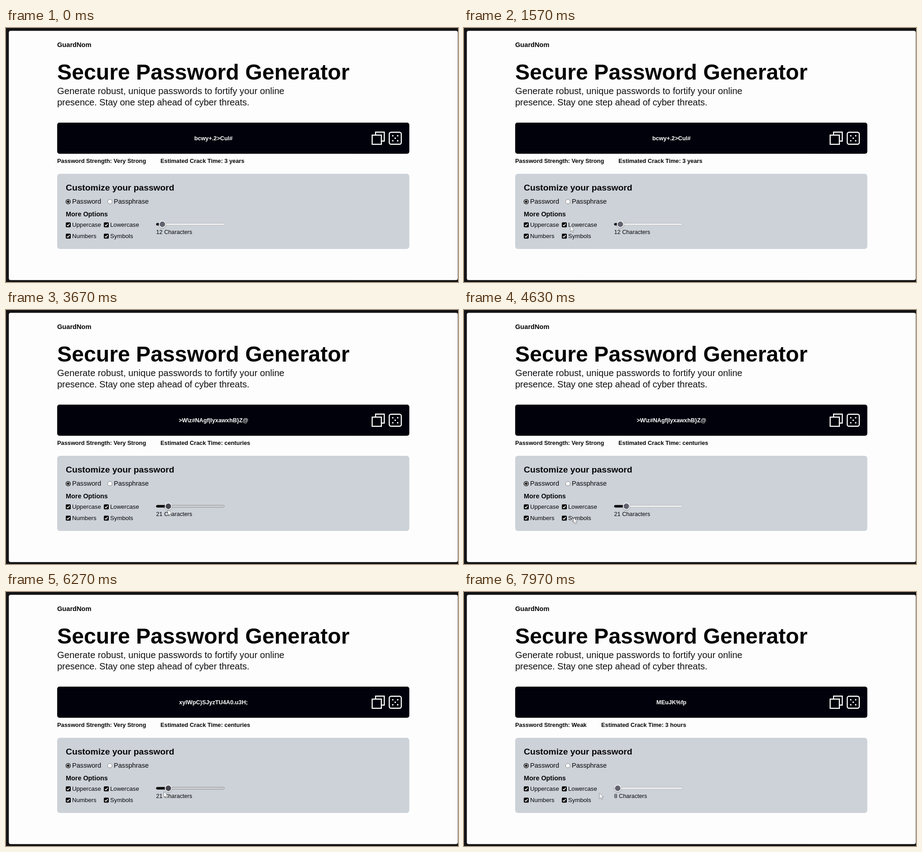
An HTML page that plays this animation: 998 by 561 pixels, repeating every 8000 ms.

```html
<!DOCTYPE html>
<html lang="en">
<head>
<meta charset="utf-8">
<title>Password generator</title>
<style>
  html, body { margin: 0; width: 100%; height: 100%; overflow: hidden; background: #141416; }
  svg { display: block; width: 100%; height: 100%; }
  text { font-family: "Liberation Sans", Arial, sans-serif; fill: #050507; white-space: pre; }
  .bold { font-weight: 700; }
  .option { font-size: 13.2px; }
  .mode { font-size: 14.6px; }
  .status { font-size: 12.8px; font-weight: 700; }
  .lead text { font-size: 20.2px; fill: #111114; }
  .tight { letter-spacing: -.12px; }
  .icon { fill: none; stroke: #fff; stroke-width: 2.4; }
</style>
</head>
<body>
<svg viewBox="0 0 998 561">
  <defs>
    <g id="box">
      <rect width="11" height="11" rx="2" fill="#050507"/>
      <path d="M2.5 5.7 4.6 7.9 8.6 3" fill="none" stroke="#fff" stroke-width="1.7"/>
    </g>
  </defs>
  <rect width="998" height="561" fill="#141416"/>
  <rect x="6.3" y="6.3" width="991.2" height="550.4" rx="4" fill="#fdfdfd"/>

  <text class="bold" x="113" y="42" font-size="14.6">GuardNom</text>
  <text class="bold" x="113" y="114" font-size="48.2">Secure Password Generator</text>
  <g class="lead">
    <text x="113" y="146">Generate robust, unique passwords to fortify your online</text>
    <text class="tight" x="113" y="171">presence. Stay one step ahead of cyber threats.</text>
  </g>

  <rect x="113" y="209" width="777.5" height="68.7" rx="5" fill="#01010c"/>
  <text id="password" class="bold" x="458" y="248" font-size="12.7" text-anchor="middle" style="fill:#fff"></text>
  <g class="icon">
    <rect x="808.5" y="236.6" width="20.3" height="20.3"/>
    <path d="M816 236V230h19.2v19.7H829"/>
    <rect x="846.2" y="230.2" width="26.6" height="26.6" rx="4"/>
  </g>
  <g id="pips" fill="#fff"></g>

  <text id="strength" class="status" x="113" y="298"></text>
  <text id="crack" class="status" y="298"></text>

  <rect x="113" y="322" width="777.5" height="166" rx="6" fill="#ccd2d8"/>
  <text class="bold" x="132" y="359.3" font-size="19.25">Customize your password</text>
  <circle cx="137.3" cy="383.5" r="4.8" fill="#fff" stroke="#050507" stroke-width="1.5"/>
  <circle cx="137.3" cy="383.5" r="2.8" fill="#050507"/>
  <circle cx="229.3" cy="383.5" r="4.9" fill="#fff" stroke="#7c7c80"/>
  <text class="mode" x="146" y="388">Password</text>
  <text class="mode" x="238" y="388">Passphrase</text>
  <text class="bold" x="132" y="416" font-size="14.4">More Options</text>

  <use href="#box" x="132" y="429.3"/>
  <use href="#box" x="216" y="429.3"/>
  <use href="#box" x="132" y="454.3"/>
  <use id="symbolsOn" href="#box" x="216" y="454.3"/>
  <rect id="symbolsOff" x="216.5" y="454.8" width="10" height="10" rx="2" fill="#fff" stroke="#767676"/>
  <text class="option" x="146" y="439">Uppercase</text>
  <text class="option" x="230" y="439">Lowercase</text>
  <text class="option" x="146" y="464.4">Numbers</text>
  <text class="option" x="230" y="464.4">Symbols</text>

  <rect id="track" x="332" y="431.3" width="150" height="4.4" rx="2.2"/>
  <rect id="filled" x="331.5" y="430.8" height="5.4" rx="2.7" fill="#050507"/>
  <g id="thumb">
    <circle cy=".8" r="8.9" fill="#000" opacity=".2"/>
    <circle id="knob" r="7.1" stroke="#f6f6f8" stroke-width="1.9"/>
  </g>
  <text id="count" x="331.5" y="455" font-size="12.7"></text>

  <path id="cursor" d="M0 0V12.6L2.9 9.9 4.9 14.5 7 13.6 5 9.1H9Z" fill="#fff" stroke="#77777c" stroke-width=".8" stroke-linejoin="round"/>
</svg>
<script>
  const LOOP = 8000;
  const $ = id => document.getElementById(id);
  const set = (id, attrs) => {
    for (const name in attrs) $(id).setAttribute(name, attrs[name]);
  };
  const show = (id, on) => set(id, { visibility: on ? "visible" : "hidden" });
  const write = (id, text) => {
    if ($(id).textContent !== text) $(id).textContent = text;
  };
  const smooth = u => u * u * (3 - 2 * u);
  const progress = (t, from, to) => smooth(Math.min(1, Math.max(0, (t - from) / (to - from))));

  // Pointer stops: time, x, y
  const path = [
    [600, 915, 356], [1400, 235, 437], [1600, 235, 437], [2150, 345, 437],
    [2680, 345, 437], [3000, 357.5, 441], [3960, 357.5, 441], [4520, 241.5, 458.5],
    [5000, 241.5, 458.5], [5200, 240, 471], [5420, 241.5, 458.5], [5880, 241.5, 458.5],
    [6240, 348.5, 441], [6320, 348.5, 441], [6470, 357, 440], [6560, 357, 440],
    [6950, 338, 441], [7350, 338, 441], [7800, 299, 444]
  ];

  // Each password holds from its time onward
  const passwords = [
    [0, "bcwy+.2>Cul#"],
    [3220, ">W\\z#NAgf|lyxawxhB}Z@"],
    [4960, "kRw7Gm2NbQxH9vtTd4WyU"],
    [5760, "xylWpC)SJyzTU4A0.u3H;"],
    [7080, "MEuJK%fp"]
  ];

  [[854, 238], [864.8, 238], [859.4, 243.5], [854, 249], [864.8, 249]].forEach(([cx, cy]) => {
    const dot = document.createElementNS($("pips").namespaceURI, "circle");
    for (const [name, value] of Object.entries({ cx, cy, r: 1.7 })) dot.setAttribute(name, value);
    $("pips").append(dot);
  });

  function pointer(t) {
    const next = path.findIndex(stop => stop[0] > t);
    if (next <= 0) return path[next < 0 ? path.length - 1 : 0].slice(1);
    const [a, b] = [path[next - 1], path[next]];
    const u = progress(t, a[0], b[0]);
    return [a[1] + (b[1] - a[1]) * u, a[2] + (b[2] - a[2]) * u];
  }

  function render(t) {
    const [x, y] = pointer(t);
    show("cursor", t >= path[0][0]);
    set("cursor", { transform: `translate(${x} ${y})` });

    const count = Math.round(12 + 9 * progress(t, 2680, 3000) - 13 * progress(t, 6560, 6950));
    const knobX = 339.4 + (count - 8) * 135 / 92;
    const hover = x > 331 && x < 483 && y > 425 && y < 443;
    set("thumb", { transform: `translate(${knobX} 433.5)` });
    set("knob", { fill: hover ? "#46464f" : "#626270" });
    set("track", { fill: hover ? "#d4d5d8" : "#f0f0f0", stroke: hover ? "#88898c" : "#b8babd" });
    set("filled", { width: knobX - 331.5 });
    write("count", count + " Characters");

    const symbols = t < 4960 || t >= 5760;
    show("symbolsOn", symbols);
    show("symbolsOff", !symbols);

    const weak = t >= 7080;
    write("password", passwords.filter(p => p[0] <= t).pop()[1]);
    write("strength", "Password Strength: " + (weak ? "Weak" : "Very Strong"));
    write("crack", "Estimated Crack Time: " + (weak ? "3 hours" : t < 3220 ? "3 years" : "centuries"));
    set("crack", { x: weak ? 303 : 341 });
  }

  const start = performance.now();
  function tick(now) {
    render(Math.max(0, now - start) % LOOP);
    requestAnimationFrame(tick);
  }
  render(0);
  requestAnimationFrame(tick);
</script>
</body>
</html>
```
